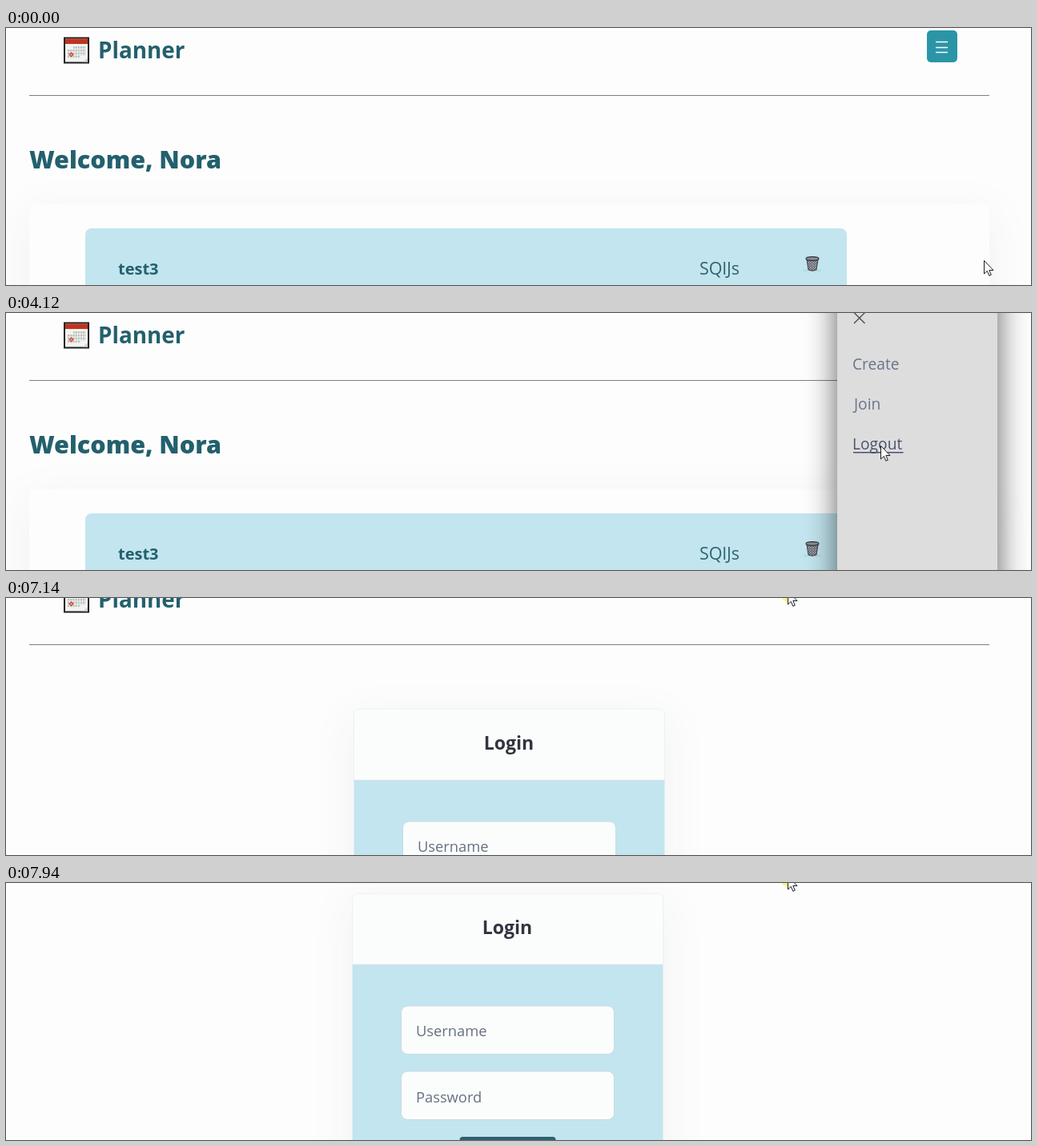
These frames come from a looping animation (1280x322 px, 8 s). An HTML page:

```html
<!DOCTYPE html>
<html lang="en">
<head>
<meta charset="utf-8">
<title>Planner</title>
<style>
  html, body { margin: 0; width: 100%; height: 100%; overflow: hidden; background: #fdfdfd; }
  svg { display: block; width: 1280px; height: 322px; }
  text { font-family: "Open Sans", "Noto Sans", sans-serif; white-space: pre; }

  .title { font-size: 27.8px; font-weight: 700; fill: #23606d; }
  .welcome { font-size: 30.5px; font-weight: 800; fill: #23606d; }
  .task { font-size: 20px; font-weight: 700; fill: #23606d; }
  .tag { font-size: 21.5px; fill: #2f6570; }
  .login-title { font-size: 23px; font-weight: 700; fill: #32343f; text-anchor: middle; }
  .hint { font-size: 18.3px; fill: #66717f; }
  .link { font-size: 19.2px; fill: #69748a; }

  .blue { fill: #c3e5ef; }
  .field { fill: #fbfdfc; stroke: #c9d9e2; }
  .card { fill: #fdfdfd; filter: drop-shadow(0 14px 26px rgba(30, 40, 90, .06)); }
  .panel { fill: #ddd; filter: drop-shadow(0 0 19px rgba(0, 0, 0, .62)); }

  .home, .login, .menu, .logout, .underline, .scroll, .cursor, .arrow, .hand, .glow {
    animation: 8s step-end infinite;
  }
  .home { animation-name: home; }
  .login { animation-name: login; }
  .menu { animation-name: menu; }
  .logout { animation-name: logout; }
  .underline { animation-name: underline; }
  .scroll { animation-name: scroll; }
  .cursor { animation-name: cursor; }
  .arrow { animation-name: arrow; }
  .hand { animation-name: hand; }
  .glow { animation-name: glow; }

  @keyframes home { 0% { opacity: 1 } 55.25%, 100% { opacity: 0 } }
  @keyframes login { 0% { opacity: 0 } 55.25%, 100% { opacity: 1 } }
  @keyframes menu { 0%, 55.25%, 100% { opacity: 0 } 14.875% { opacity: 1 } }
  @keyframes logout { 0% { fill: #69748a } 23.75%, 100% { fill: #4a5170 } }
  @keyframes underline { 0% { opacity: 0 } 23.75%, 100% { opacity: 1 } }
  @keyframes arrow { 0%, 19.875%, 51.5%, 100% { opacity: 1 } 9.875%, 23.75% { opacity: 0 } }
  @keyframes hand { 0%, 19.875%, 51.5%, 100% { opacity: 0 } 9.875%, 23.75% { opacity: 1 } }
  @keyframes glow { 0% { opacity: 0 } 88%, 100% { opacity: 1 } }

  @keyframes scroll {
    0% { transform: none }
    88% { transform: translate(0, -7px) }
    89.25% { transform: translate(0, -26px) }
    90.5% { transform: translate(-1px, -50px) }
    91.75% { transform: translate(-1px, -70px) }
    93% { transform: translate(-1px, -88px) }
    94.25% { transform: translate(-1px, -107px) }
    95.5% { transform: translate(-2px, -126px) }
    96.75% { transform: translate(-2px, -141px) }
    98% { transform: translate(-2px, -150px) }
    99.25%, 100% { transform: translate(-2px, -152px) }
  }

  @keyframes cursor {
    0% { transform: translate(1221px, 291px) }
    1.25% { transform: translate(1209px, 228px) }
    2.5% { transform: translate(1185px, 134px) }
    3.75% { transform: translate(1169px, 81px) }
    7.375% { transform: translate(1167px, 70px) }
    8.625% { transform: translate(1165px, 52px) }
    9.875% { transform: translate(1163px, 37px) }
    11.125% { transform: translate(1163px, 29px) }
    19.875% { transform: translate(1152px, 50px) }
    21.125% { transform: translate(1130px, 87px) }
    22.375% { transform: translate(1109px, 128px) }
    23.75% { transform: translate(1096px, 157px) }
    25.125% { transform: translate(1092px, 166px) }
    63.875% { transform: translate(1040px, 199px) }
    65.125% { transform: translate(996px, 218px) }
    72.75% { transform: translate(992px, 193px) }
    74% { transform: translate(983px, 150px) }
    75.25% { transform: translate(976px, 120px) }
    77.75% { transform: translate(971px, 86px) }
    79% { transform: translate(967px, 49px) }
    80.25% { transform: translate(968px, 24px) }
    81.5% { transform: translate(972px, 4px) }
    82.875%, 100% { transform: translate(976px, -9px) }
  }
</style>
</head>
<body>
<svg viewBox="0 0 1280 322">
  <defs>
    <pattern id="days" x="77" y="23" width="3.2" height="3.8" patternUnits="userSpaceOnUse">
      <rect width="2.2" height="2.6" fill="#b4bdb6"/>
    </pattern>
    <pattern id="mesh" width="3" height="3" patternUnits="userSpaceOnUse">
      <rect width="3" height="3" fill="#62666d"/>
      <path d="M0 0L3 3M3 0L0 3" stroke="#a9adb3" stroke-width=".7"/>
    </pattern>
  </defs>

  <rect width="1280" height="322" fill="#fdfdfd"/>

  <g class="scroll">
    <g class="login">
      <rect class="card" x="434.5" y="165" width="388" height="420" rx="6"/>
      <path d="M434.5 254V171a6 6 0 0 1 6-6H816.5a6 6 0 0 1 6 6V254z" fill="#fbfdfc" stroke="#eaf1f3"/>
      <rect class="blue" x="434.5" y="254" width="388" height="330"/>
      <path d="M434.5 254.5h388" stroke="#d5e3e8"/>
      <text class="login-title" x="628" y="216">Login</text>
      <rect class="field" x="495.5" y="306" width="266" height="60.5" rx="8"/>
      <text class="hint" x="514" y="344">Username</text>
      <rect class="field" x="495.5" y="388" width="266" height="60.5" rx="8"/>
      <text class="hint" x="514" y="427">Password</text>
      <rect x="568.5" y="470" width="120" height="44" rx="4" fill="#2f6070"/>
    </g>

    <!-- page header -->
    <rect x="73" y="12.5" width="30" height="31" fill="#f3f4f2" stroke="#1d1d1d" stroke-width="2"/>
    <rect x="74" y="13.5" width="28" height="6.5" fill="#c1341f"/>
    <path d="M84 23H99.5V34.5H93V38H77V27H84z" fill="url(#days)"/>
    <path d="M81.5 31l2.3 2.3-2.3 2.3-2.3-2.3z" fill="#e9b4aa" stroke="#d2382a" stroke-width="1.2"/>
    <path d="M102 37v5.5h-6z" fill="#d5d8d5"/>
    <text class="title" x="115" y="38">Planner</text>
    <path d="M29 84.5H1228" stroke="#7f7f7f"/>
  </g>

  <g class="home">
    <rect x="1150" y="3" width="38" height="40" rx="5" fill="#2b95a8"/>
    <path d="M1161 17.5h15M1161 24.5h15M1161 30.5h15" stroke="#fff" stroke-width="1.4"/>
    <text class="welcome" x="29" y="176">Welcome, Nora</text>
    <rect class="card" x="29" y="221" width="1199" height="400" rx="6"/>
    <rect class="blue" x="99" y="251" width="951" height="200" rx="8"/>
    <text class="task" x="140" y="309">test3</text>
    <text class="tag" x="866" y="309">SQlJs</text>
    <path d="M996 304h22" stroke="#a9c9d2"/>
    <path d="M1000 290l2 13q5 2.5 10 0l2-13z" fill="url(#mesh)" stroke="#3a3c42"/>
    <ellipse cx="1007" cy="289" rx="8" ry="2.3" fill="#8b8e94" stroke="#303238" stroke-width="1.2"/>
  </g>

  <g class="menu">
    <rect class="panel" x="1038" y="-100" width="200" height="522"/>
    <path d="M1059 -.5L1072.5 13M1072.5 -.5L1059 13" stroke="#4b4f58" stroke-width="1.4"/>
    <text class="link" x="1057" y="71">Create</text>
    <text class="link" x="1059" y="121">Join</text>
    <text class="link logout" x="1057" y="171">Logout</text>
    <path class="underline" d="M1058 174.8h62.5" stroke="#4a5170" stroke-width="1.5"/>
  </g>

  <g class="cursor">
    <circle class="glow" cx="1" cy="5" r="9" fill="#fbf48a"/>
    <path class="arrow" d="M.5 .5V17L4.3 13.4 6.8 19.3 9.3 18.2 6.8 12.5H12z" fill="#fff" stroke="#1c1c24"/>
    <g class="hand" fill="#fff" stroke="#1c1c24" stroke-linejoin="round">
      <path d="M.5 13V2.2a1.7 1.7 0 0 1 3.4 0V8q2-1 2.9.8 1.8-.9 2.5.9 2.2-.5 2.2 1.8V16c0 3-1.8 4-2 7.5H1.5C1.5 20-1 19-2.5 16L-4.2 13c-1-2 1.2-3 2.5-1.5z"/>
      <path d="M3.9 8v4M6.8 8.8V12.5M9.3 9.7V13" fill="none"/>
    </g>
  </g>
</svg>
</body>
</html>
```
